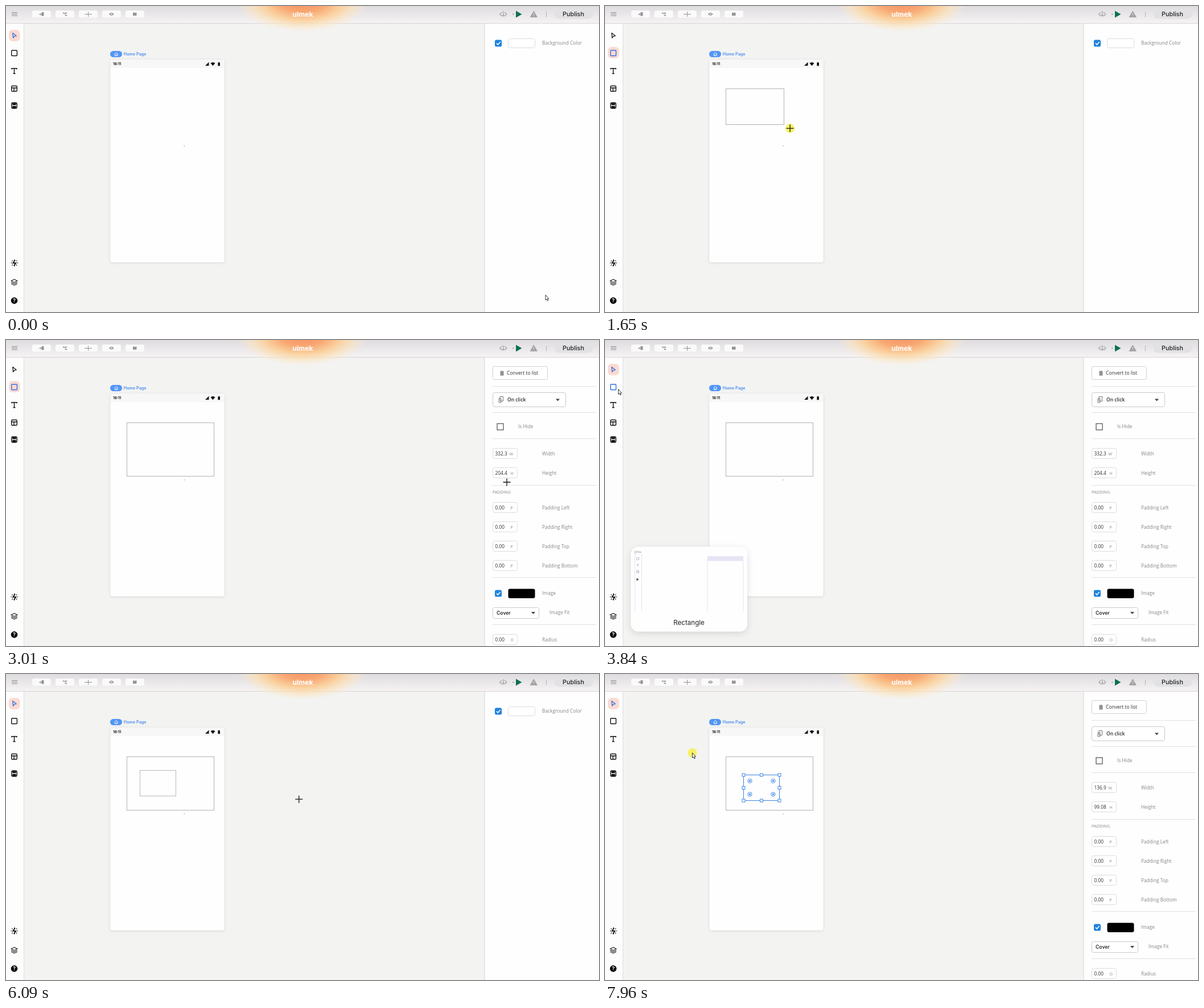
Animation of 1042 by 538 pixels, one loop 8 s. Source, as an HTML page:

```html
<!DOCTYPE html>
<html lang="en">
<head>
<meta charset="utf-8">
<title>App builder</title>
<style>
html, body { margin: 0; width: 100%; height: 100%; overflow: hidden; background: #f3f3f2 }
svg { display: block; width: 1042px; height: 538px }
text { font: 8.3px "Open Sans", sans-serif; fill: #85858a }
.wide { font-family: Inter, sans-serif }
.dark { fill: #2c2c2e }
.line { fill: none; stroke: currentColor }
.box { fill: #fff; stroke: #dcdcde }
.tool { color: #111 }
.tool.on { color: #2c70e0 }
</style>
</head>
<body>
<svg viewBox="0 0 1042 538">
  <defs>
    <radialGradient id="glow" gradientUnits="userSpaceOnUse" cx="0" cy="0" r="1" gradientTransform="translate(521 -8) scale(116 54)">
      <stop offset="0" stop-color="#f58e60"/>
      <stop offset=".35" stop-color="#f8a873"/>
      <stop offset=".6" stop-color="#fbd09b" stop-opacity=".95"/>
      <stop offset=".8" stop-color="#fbe3bd" stop-opacity=".65"/>
      <stop offset="1" stop-color="#fbead0" stop-opacity="0"/>
    </radialGradient>
    <linearGradient id="bar" x2="0" y2="1">
      <stop offset="0" stop-color="#dfdce0"/>
      <stop offset="1" stop-color="#f6f3f4"/>
    </linearGradient>
    <filter id="soft" x="-20%" y="-20%" width="140%" height="140%">
      <feDropShadow dx="0" dy="1" stdDeviation="2" flood-opacity=".13"/>
    </filter>
    <filter id="deep" x="-20%" y="-20%" width="140%" height="150%">
      <feDropShadow dx="0" dy="3" stdDeviation="6" flood-opacity=".13"/>
    </filter>
    <pattern id="dots" width="7" height="7" patternUnits="userSpaceOnUse">
      <circle cx="2" cy="2" r=".6" fill="#f1f0dc"/><circle cx="5.5" cy="5.5" r=".5" fill="#f0eff8"/>
    </pattern>
  </defs>

  <rect width="1042" height="538" fill="#f3f3f2"/>

  <!-- phone -->
  <rect x="183.5" y="94" width="200" height="356.5" rx="4" fill="#fefefe" filter="url(#soft)"/>
  <path d="M184 109V98q0-4 4-4h191q4 0 4 4v11z" fill="#f7f7f7"/>
  <text class="wide" x="188.3" y="104" style="font-size:6.1px;font-weight:700;fill:#111">16:11</text>
  <path d="M350 105h6.5v-6.5zM359.5 100.500q4-3 8 0l-4 4.700zM372.400 99.500h1v-.7h1.400v.7h1.200v5.700h-3.600z" fill="#111"/>
  <rect x="183" y="79" width="21" height="11" rx="5.5" fill="#5396f5"/>
  <path d="M190.800 84.500l3-2.700 3 2.700M191.500 84v3.300h4.600V84M193.800 87v-1.800" class="line" color="#fff" stroke-width=".9"/>
  <text class="wide" x="206.800" y="87.300" style="font-size:7.2px;font-weight:600;fill:#4c8df0">Home Page</text>
  <path d="M312 246h2.500" stroke="#aaa"/>

  <rect id="outer" x="212.500" y="145.500" class="line" color="#b2b2b4"/>
  <rect id="inner" x="235.500" y="169.500" class="line" color="#b9b9bb"/>
  <g id="pick" class="line" color="#3d84e2"></g>

  <!-- header -->
  <rect width="1042" height="30" fill="url(#bar)"/>
  <path d="M0 30.500h1042" stroke="#d9d3d7"/>
  <rect x="400" width="242" height="48" fill="url(#glow)"/>
  <path d="M10 11.500h10M10 14.200h10M10 17h10" stroke="#8b898c"/>
  <g id="tabs" fill="#fafafa"></g>
  <g fill="#929294" stroke="#929294" stroke-width="1">
    <path d="M58 14.500h5M61 12.500v4" fill="none"/><rect x="63" y="11.500" width="3" height="5.500"/>
    <path d="M101 12.500h3v4h2.500M103 12.500h3" fill="none"/><path d="M100 11.500h2v2h-2zM105 11.500h2v2h-2zM105 15.700h2v2h-2z" stroke="none"/>
    <path d="M138 14.500h13M144.500 10v9" fill="none"/>
    <path d="M181 14.200q4.300-5.600 8.600 0q-4.300 5.600-8.600 0z" stroke="none"/><circle cx="185.300" cy="14.200" r="1.300" fill="#929294" stroke="#fafafa"/>
    <path d="M223 11.800q1.800-.6 3.200.3v5.200q-1.400-.9-3.200-.3zM229.500 11.800q-1.800-.6-3.200.3v5.200q1.400-.9 3.200-.3z" stroke="none"/>
  </g>
  <text class="wide" x="521.500" y="19" text-anchor="middle" style="font-size:12px;font-weight:700;fill:#fff">ulmek</text>
  <path d="M871.500 11l-4 3.500 4 3.500M876 11l4 3.500-4 3.500M873.800 9v9M871.800 15.500l2 2.500 2-2.500" class="line" color="#a3a2a5" stroke-width="1.200"/>
  <circle cx="891.300" cy="14.500" r="1.300" fill="#a9a8aa"/>
  <path d="M896 8.500l10.500 6-10.500 6z" fill="#0c7053"/>
  <path d="M927.300 9l6 10.500h-12z" fill="#a3a2a5" stroke="#a3a2a5" stroke-linejoin="round"/>
  <path d="M927.300 12.500v3.200M927.300 17v1" stroke="#f2f0f2"/>
  <path d="M949.500 10v9.500" stroke="#b3b1b4"/>
  <rect x="963.500" y="6" width="68" height="16.500" rx="8.200" fill="#e2e1e3"/>
  <text class="wide" x="997" y="18" text-anchor="middle" style="font-size:10.800px;font-weight:500;fill:#222">Publish</text>

  <!-- tools -->
  <path d="M0 31h31v507H0z" fill="#fdfdfd"/>
  <path d="M31.500 31v507" stroke="#dedddf"/>
  <rect id="mark" x="5" width="19.500" height="20" rx="6" fill="#fcdad2"/>
  <path id="arrowTool" class="line tool" d="M11.800 47.500l6.300 5-3.200.6-2.300 2.900z" stroke-width="1.300" stroke-linejoin="round"/>
  <rect id="rectTool" class="line tool" x="9.700" y="78" width="9.700" height="9.500" rx="1" stroke-width="1.400"/>
  <g class="line" color="#111" stroke-width="1.400">
    <path d="M10 111.500V109.700h9v1.800M14.500 109.700v9M12.500 118.700h4"/>
    <rect x="9.700" y="140.500" width="9.600" height="9.500" rx="1.500"/><path d="M9.700 144h9.600M14 144v6"/>
    <rect x="9.800" y="170" width="9.400" height="10" rx="2.500"/><path d="M12 171.500h5v2h-5zM12 176.500h5v2.500h-5z" fill="#111"/>
    <path d="M15.800 446.500l-3.300 5.300h4.600l-3.200 5.200" stroke-width="1.800"/>
    <path id="rays" stroke-width="1.100"/>
    <path d="M14.500 480.500l5.300 2.700-5.300 2.700-5.300-2.700zM9.200 485.700l5.300 2.700 5.300-2.700M9.200 488.200l5.300 2.700 5.300-2.700" stroke-width="1.100"/>
  </g>
  <circle cx="14.500" cy="518" r="5.800"/>
  <text class="wide" x="14.500" y="521.200" text-anchor="middle" style="font-size:9px;font-weight:700;fill:#fff">?</text>

  <!-- side panel -->
  <path d="M841 31h201v507H841z" fill="#fefefe"/>
  <path d="M841 31v507" stroke="#d5d3d6"/>
  <g id="page"></g>
  <g id="props"></g>

  <!-- tool preview -->
  <g id="card">
    <rect x="45.500" y="363.500" width="204.500" height="149" rx="13" fill="#fefefe" filter="url(#deep)"/>
    <path d="M65 376h178v101H65z" fill="url(#dots)"/>
    <path d="M180 380h63v8.500h-63z" fill="#e6e4f4"/>
    <path d="M52.500 371v106M64.500 376v101M180 388v89M243 388v89" stroke="#e6e6ec"/>
    <path d="M52.500 371h3v3.500h-3zM55.500 382.500h4v4h-4zM55.500 394.500h4M57.500 394.500v4M55.500 405.500h4v4h-4zM55.500 407h4" class="line" color="#9b9b9f" stroke-width=".6"/>
    <path d="M55.500 418.500l4 2.500-4 2.500z" fill="#444"/>
    <text class="wide" x="57" y="374" style="font-size:3px;fill:#555">Prop</text>
    <g id="hint"><path d="M65 388h28v5H65z" fill="#f3f3f4"/><text x="65.500" y="391.500" style="font-size:3.100px;fill:#333">Rectangle Toggle</text></g>
    <text id="cardName" class="wide" x="147.600" y="501" text-anchor="middle" style="font-size:11.600px">Rectangle</text>
  </g>

  <!-- pointer -->
  <g id="cursor">
    <circle id="halo" r="8" fill="#f6f04c" opacity=".85"/>
    <path id="cross" d="M-6.500 0h13M0-6.500v13" stroke="#111" stroke-width="1.300"/>
    <path id="arrow" d="M0 0v9l2-1.700 1.400 3 1.400-.6-1.400-3h2.500z" fill="#fff" stroke="#222" stroke-width=".9"/>
  </g>
</svg>
<script>
const $ = id => document.getElementById(id);
const set = (id, attrs) => { for (const k in attrs) $(id).setAttribute(k, attrs[k]); };
const show = (id, on) => $(id).style.display = on ? '' : 'none';

const label = (x, y, s, css = '', cls = '') => `<text x="${x}" y="${y}" class="${cls}" style="${css}">${s}</text>`;
const box = (x, y, w, h, extra = '') => `<rect class="box" x="${x}.5" y="${y}.5" width="${w}" height="${h}" rx="3" ${extra}/>`;
const tick = y => `<rect x="859" y="${y - 6}" width="12" height="12" rx="2.500" fill="#1f83dd"/>
  <path d="M862 ${y}l2.300 2.500 4.300-5" class="line" color="#fff" stroke-width="1.500"/>`;
const rule = y => `<path d="M855 ${y}.5h183" stroke="#e2e1e3"/>`;
const caret = (x, y) => `<path d="M${x - 3.5} ${y - 1.5}h7l-3.500 4z" fill="#444"/>`;
const field = (y, unit, name, id = '') => box(855, y - 10, 43, 18) +
  `<text x="859.500" y="${y + 3}" class="dark" id="${id}">0.00</text>` +
  label(unit == 'W' ? 884.5 : 886.5, y + 2.700, unit, 'font-size:7px') + label(942, y + 2.700, name);

$('tabs').innerHTML = [46, 87, 128, 169, 210].map(x => `<rect x="${x}" y="8" width="33" height="12.500" rx="3"/>`).join('');
let rays = '';
for (let a = 0; a < 8; a++) {
  const c = Math.cos(a * Math.PI / 4), s = Math.sin(a * Math.PI / 4);
  rays += `M${14.8 + 4 * c} ${451.8 + 4 * s}L${14.8 + 6.3 * c} ${451.8 + 6.3 * s}`;
}
set('rays', { d: rays });

$('page').innerHTML = tick(65.5) + box(882, 57, 47, 16) + label(942, 68.300, 'Background Color', 'font-size:8.400px');
$('props').innerHTML =
  box(855, 46, 96, 23, 'style="stroke:#cfcfd1"') + label(880, 61.300, 'Convert to list', 'font-size:8.500px', 'dark') +
  '<rect x="868.500" y="54" width="6" height="9" rx="1" fill="#aaa"/><path d="M868.500 56.500h6M868.500 58.500h6M868.500 60.500h6" stroke="#666" stroke-width=".7"/>' +
  rule(81) + box(855, 92, 128, 25, 'style="stroke:#c9c9cb"') +
  '<path d="M868 99.500h5.500v8H868zM866 103h4v7h-4z" class="line" color="#777"/>' +
  label(881, 108.200, 'On click', 'font-size:8.500px;font-weight:600', 'dark') + caret(969.5, 105) +
  rule(127) + '<rect x="863" y="147" width="11" height="11" class="line" color="#666" stroke-width="1.400"/>' +
  label(900, 155, 'Is Hide') + rule(173) +
  field(200, 'W', 'Width', 'wide') + field(234, 'H', 'Height', 'tall') + rule(255) +
  label(855, 269.700, 'PADDING', 'font-size:7.300px') +
  ['Left', 'Right', 'Top', 'Bottom'].map((s, i) => field(Math.round(294.5 + 34.1 * i), 'P', 'Padding ' + s)).join('') +
  rule(417) + tick(445.5) + '<rect x="882.500" y="437.500" width="47" height="16.500" rx="3"/>' + label(942, 448, 'Image') +
  box(855, 470, 81, 19, 'style="stroke:#c9c9cb"') +
  label(862, 482.500, 'Cover', 'font-size:8.600px;font-weight:600', 'wide dark') + caret(926.5, 479.5) +
  label(955, 482.200, 'Image Fit') + rule(500) + field(527, 'O', 'Radius');

const dots = [254.5, 295.5].flatMap(x => [188, 211.5].map(y =>
  `<circle cx="${x}" cy="${y}" r="3.600" fill="#fff"/><circle cx="${x}" cy="${y}" r="1.200" fill="#3d84e2"/>`)).join('');
const grips = [243.5, 275, 306.5].flatMap(x => [177.5, 200, 222.5].map(y =>
  x == 275 && y == 200 ? '' : `<rect x="${x - 2.5}" y="${y - 2.5}" width="5" height="5" fill="#fff"/>`)).join('');
$('pick').innerHTML = '<rect x="243.500" y="177.500" width="63" height="45"/>' + grips + `<g id="dots">${dots}</g>`;

// pointer path: time, x, y
const path = [
  [0, 948, 508], [60, 948, 508], [200, 780, 410], [340, 420, 230], [480, 120, 110], [600, 24, 84], [760, 12, 82],
  [885, 12, 82], [950, 67.5, 104.5], [1150, 170, 130], [1380, 212, 145], [1650, 325, 215], [1900, 348, 234],
  [2130, 354.5, 238], [2250, 365.5, 239.5], [2460, 412, 240], [2600, 540, 245], [3010, 880, 250], [3330, 880, 250],
  [3620, 28, 88], [3840, 23.5, 86.5], [4090, 8, 85], [4250, 14, 84], [4500, 120, 125], [4760, 235, 169],
  [4940, 273, 192.5], [5150, 298.5, 214.5], [5350, 450, 222], [5750, 875, 228], [5890, 518, 220.5], [6085, 518, 220.5],
  [6550, 268, 192], [6900, 268, 192], [7250, 276, 200], [7700, 198, 130], [7800, 168, 120], [7900, 153.5, 138.5], [8001, 153.5, 138.5]
];
function at(t) {
  const i = path.findIndex(p => p[0] > t), [a, x, y] = path[i - 1], [b, u, v] = path[i];
  const k = (t - a) / (b - a);
  return [x + (u - x) * k, y + (v - y) * k];
}
const within = (t, ...spans) => spans.some(([a, b]) => t >= a && t < b);
const fade = (t, a, b) => Math.max(0, Math.min(1, (t - a) / 100, (b - t) / 100));

function drag(id, t, start, end, x, y) {
  show(id, t >= start);
  if (t < start) return;
  const [u, v] = at(Math.max(start, Math.min(t - 25, end)));
  set(id, { width: Math.max(0, Math.round(u - x)), height: Math.max(0, Math.round(v - y)) });
}

function draw(t) {
  const [x, y] = at(t);
  set('cursor', { transform: `translate(${x} ${y})` });
  const cross = within(t, [885, 3400], [4230, 6150]);
  show('cross', cross);
  show('arrow', !cross);
  show('halo', within(t, [1380, 2250], [4760, 5150], [6550, 7250], [7890, 8000]));

  const drawing = within(t, [885, 3335], [4230, 6085]);
  set('mark', { y: drawing ? 72 : 42 });
  $('arrowTool').classList.toggle('on', !drawing);
  $('rectTool').classList.toggle('on', drawing || within(t, [590, 885], [3620, 4230]));

  $('card').style.opacity = Math.max(fade(t, 560, 1120), fade(t, 3640, 4380));
  show('hint', t < 2000);
  $('cardName').style.fill = t < 2000 ? '#474d5e' : '#222';

  drag('outer', t, 1380, 2250, 212.5, 145.5);
  drag('inner', t, 4760, 5150, 235.5, 169.5);
  const picked = t >= 6600;
  if (picked) show('inner', false);
  show('pick', picked);
  show('dots', t >= 7830);
  const shift = 8 * (Math.max(0, Math.min(1, (t - 6900) / 350)) - 1);
  set('pick', { transform: `translate(${shift} ${shift})` });

  const props = within(t, [2740, 5820], [6680, 8000]);
  show('props', props);
  show('page', !props);
  $('wide').textContent = t < 6000 ? '332.3' : '136.9';
  $('tall').textContent = t < 6000 ? '204.4' : '99.08';
}

const begin = performance.now();
(function loop() {
  draw((performance.now() - begin) % 8000);
  requestAnimationFrame(loop);
})();
</script>
</body>
</html>
```
